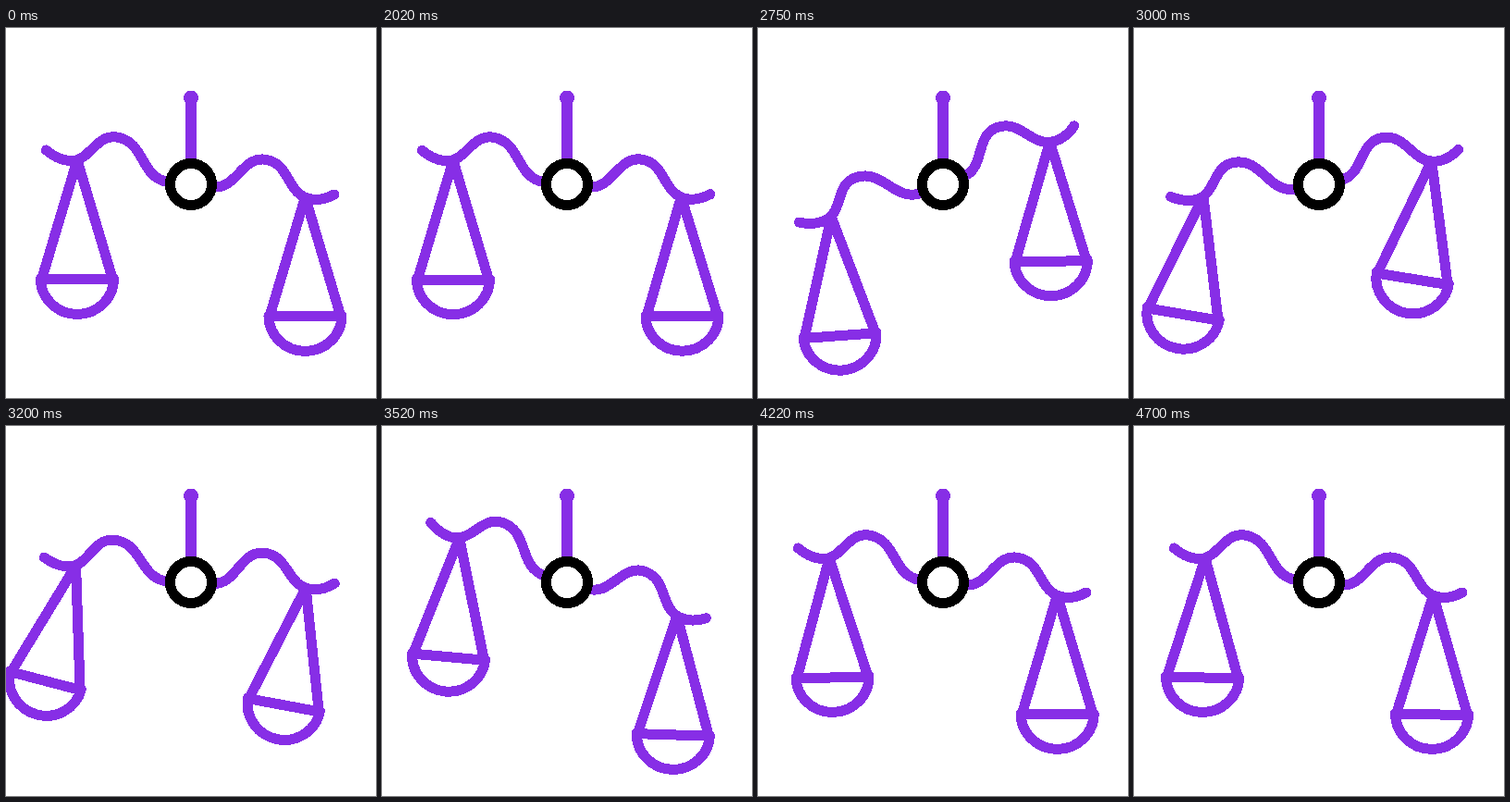
An HTML page for the animation above (4.72 s loop, 400 by 400 pixels).

```html
<!DOCTYPE html>
<html lang="en">
<head>
<meta charset="utf-8">
<title>Balance scales</title>
<style>
  html, body { margin: 0; width: 100%; height: 100%; overflow: hidden; background: #fff; }
  svg { display: block; width: 100%; height: 100%; shape-rendering: crispEdges; }
  .line { fill: none; stroke: #872ee6; stroke-width: 11; stroke-linecap: round; stroke-linejoin: round; }
</style>
</head>
<body>
<svg viewBox="0 0 400 400">
  <defs>
    <g id="pan" class="line">
      <path d="M-38.5 129 L0 0 L38.5 129 Z"/>
      <path d="M-39.5 128 A39.5 38.5 0 0 0 39.5 128"/>
    </g>
  </defs>
  <path class="line" style="stroke-width:12" d="M200 76 V145"/>
  <circle cx="200" cy="75.5" r="8" fill="#872ee6"/>
  <path id="beam" class="line"/>
  <use id="left" href="#pan"/>
  <use id="right" href="#pan"/>
  <circle cx="200" cy="169" r="22.5" fill="#fff" stroke="#000" stroke-width="11"/>
</svg>
<script>
  const LOOP = 4720, REST = 2020, CX = 200, CY = 169;
  const LAG = 30, RIGHT_SCALE = 0.75;
  const el = id => document.getElementById(id);
  const beam = el('beam'), left = el('left'), right = el('right');

  // One arm: an S-wave from hub over hump to valley, then a curled tip.
  function arm(hub, hump, valley, tip) {
    const wave = ([x0, y0], [x1, y1]) => {
      const mid = (x0 + x1) / 2;
      return `C${mid} ${y0} ${mid} ${y1} ${x1} ${y1}`;
    };
    const curl = (valley[0] + tip[0]) / 2;
    return `M${hub}` + wave(hub, hump) + wave(hump, valley) + `Q${curl} ${valley[1]} ${tip}`;
  }
  beam.setAttribute('d',
    arm([-25, 1.5], [-87, -37.5], [-136, -4], [-160.5, -11.5]) +
    arm([23, -1], [75.5, -39.3], [131, -5], [154.6, -13.9]));

  // Turning points of each swing: [time in ms, degrees]
  const tilts = [[2000, 9.2], [2620, -18.9], [2740, -18.9], [3520, 19.6], [3960, 9.2]];
  const swings = [[2000, 0], [2380, -12.5], [2465, -12.5], [3160, 14.7], [3885, -7.2], [4435, 2.4], [4930, 0]];

  function ease(keys, t) {
    const i = keys.findIndex(k => t < k[0]);
    if (i < 1) return keys[i ? keys.length - 1 : 0][1];
    const [t0, a] = keys[i - 1], [t1, b] = keys[i];
    const u = (t - t0) / (t1 - t0);
    return a + (b - a) * u * u * (3 - 2 * u);
  }

  // Hang a pan from a point given in the beam's own coordinates.
  function hang(pan, x, y, tilt, swing) {
    const r = tilt * Math.PI / 180, c = Math.cos(r), s = Math.sin(r);
    pan.setAttribute('transform',
      `translate(${CX + x * c - y * s} ${CY + x * s + y * c}) rotate(${swing})`);
  }

  function draw(time) {
    const t = time < REST ? 0 : time;
    const tilt = ease(tilts, t);
    beam.setAttribute('transform', `translate(${CX} ${CY}) rotate(${tilt})`);
    // The right pan moves a little earlier and less far than the left.
    hang(left, -125.6, -6, tilt, ease(swings, t - LAG));
    hang(right, 124.1, -6, tilt, ease(swings, t + LAG) * RIGHT_SCALE);
  }

  const start = performance.now();
  function tick() {
    draw((performance.now() - start) % LOOP);
    requestAnimationFrame(tick);
  }
  draw(0);
  requestAnimationFrame(tick);
</script>
</body>
</html>
```
